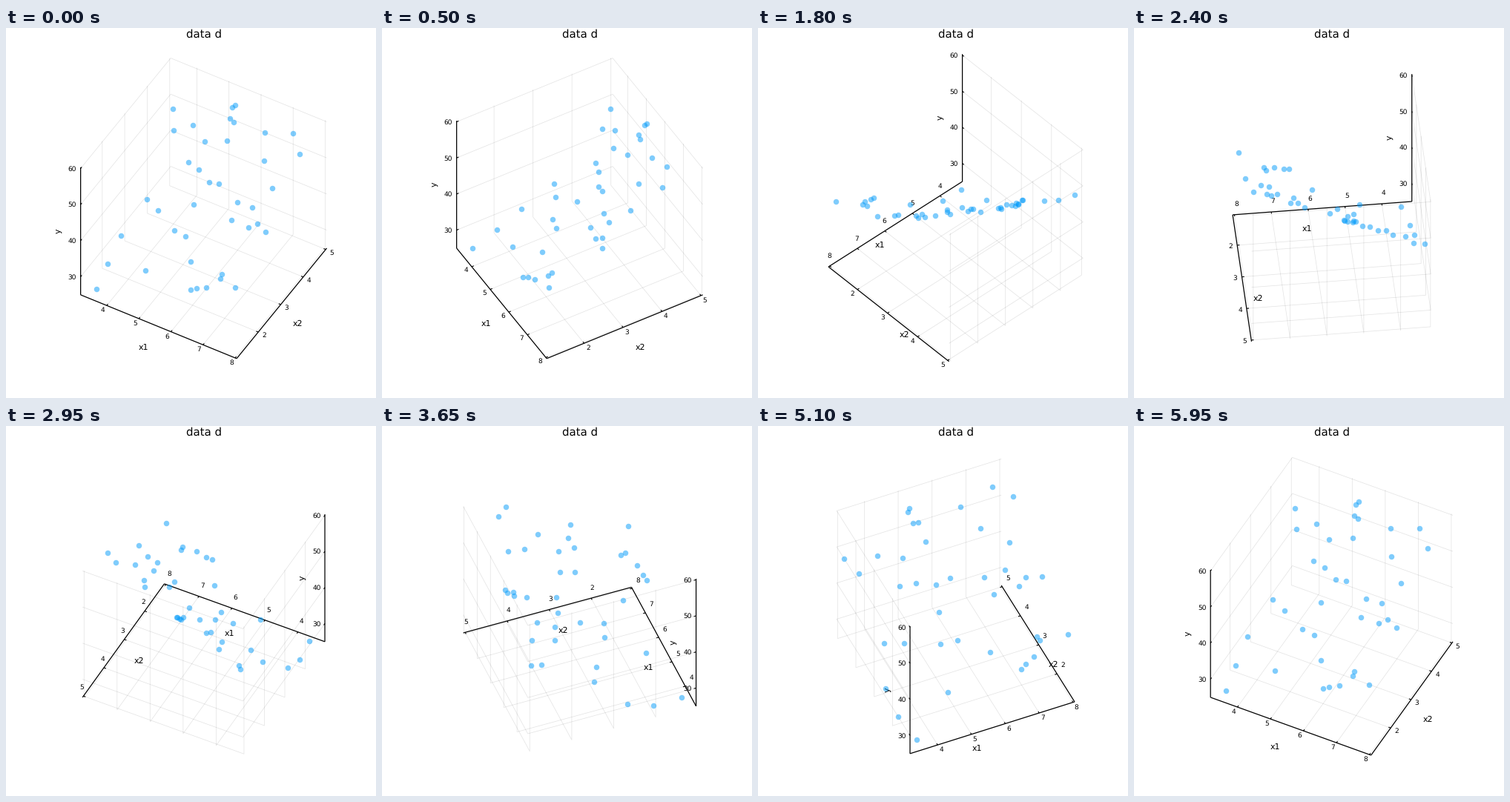
Recreate the animation shown at these times as a matplotlib script. Size 499 px wide and 499 px high, loop 6000 ms.

```python
import numpy as np
import matplotlib.pyplot as plt
from matplotlib.animation import FuncAnimation
from matplotlib.collections import LineCollection

SIZE, DPI = 499, 64
PX = 72 / DPI                    # points per pixel
FRAMES, INTERVAL = 120, 50
EDGE = 243.0                     # cube edge in pixels
H = EDGE / 2
CX, CY = 266.6, 242.5            # cube centre on the stage
TILT = np.sqrt(0.5)              # camera elevation of 45 degrees
TICK_LEN = 3.2
TITLE_EM, LABEL_EM, TICK_EM = 15, 11.2, 8.8

# Observations as (x1, x2, y) offsets from the cube centre
POINTS = np.array([
    (-113.8, 113.9, 32.6), (-101.1, 93.9, 16.3), (-72.8, 96.9, 36.8),
    (-43.4, 77.9, 37.2), (-20.6, 112.4, 84.1), (-17.4, 114.9, 88.0),
    (-18.0, 101.9, 72.5), (-11.0, 99.9, 71.7), (-9.3, 79.9, 53.6),
    (45.6, 85.9, 91.6), (90.6, 82.9, 115.0), (113.1, 62.9, 105.3),
    (61.4, 56.4, 71.3), (-56.9, 57.4, 8.2), (-36.7, 50.4, 11.4),
    (-12.5, 36.4, 11.5), (6.0, 31.4, 21.6), (91.2, 25.9, 60.8),
    (46.7, 10.9, 24.8), (74.1, 2.4, 35.9), (-20.8, 7.9, -10.2),
    (-98.2, 16.9, -47.3), (-73.7, 4.4, -46.1), (50.5, -12.6, 12.3),
    (82.8, -23.6, 24.8), (94.6, -19.1, 33.8), (114.0, -30.6, 36.9),
    (-114.7, -24.6, -88.5), (-32.4, -23.1, -38.8), (-11.0, -30.1, -33.6),
    (19.6, -70.1, -32.7), (-112.9, -63.6, -108.0), (-46.0, -77.6, -75.0),
    (-105.4, -106.6, -114.6), (45.8, -114.6, -34.8), (53.3, -111.6, -30.8),
    (66.9, -109.1, -24.3), (81.6, -96.6, -10.3), (79.9, -89.6, -9.2),
    (114.8, -114.1, 3.8),
])


def scale(values, lo, hi):
    return [((v - lo) / (hi - lo) - 0.5) * EDGE for v in values]


X_VALS, Y_VALS, Z_VALS = range(4, 9), range(2, 6), range(30, 70, 10)
XT = scale(X_VALS, 3.185, 8.047)
YT = scale(Y_VALS, 1.039, 5.045)
ZT = scale(Z_VALS, 24.98, 60.28)

AXES = np.array([
    [(-H, -H, -H), (H, -H, -H)],
    [(H, -H, -H), (H, H, -H)],
    [(-H, -H, -H), (-H, -H, H)],
])
TICKS = np.array(
    [[(x, -H, -H), (x, -H + TICK_LEN, -H)] for x in XT]
    + [[(H, y, -H), (H - TICK_LEN, y, -H)] for y in YT]
    + [[(-H, -H, z), (-H, -H + TICK_LEN, z)] for z in ZT])
GRID = np.array(
    [[(x, -H, -H), (x, H, -H), (x, H, H)] for x in XT]
    + [[(H, y, -H), (-H, y, -H), (-H, y, H)] for y in YT]
    + [[(-H, -H, z), (-H, H, z), (H, H, z)] for z in ZT])


def project(p, az):
    c, s = np.cos(az), np.sin(az)
    x, y, z = p[..., 0], p[..., 1], p[..., 2]
    return np.stack([CX + x * c + y * s,
                     CY + TILT * (x * s - y * c - z)], axis=-1)


def tick_shift(axis):
    """Offset of tick labels, pushed outwards from a projected axis."""
    dx, dy = axis[1] - axis[0]
    n = np.array([-dy, dx]) / np.hypot(dx, dy)
    if abs(n[0]) < 1e-6:
        pad = (0, 5.5 * np.sign(n[1]))
    elif abs(n[1]) < 1e-6:
        pad = (2.9 * np.sign(n[0]), 0)
    else:
        up = n[1] < 0
        pad = (2.9 if n[0] > 0 or up else -2.9, -8.9 if up else 0.3)
    return 6 * n + pad


plt.rcParams.update({"font.family": "DejaVu Sans", "path.snap": False,
                     "text.hinting": "none", "text.hinting_factor": 1})
fig = plt.figure(figsize=(SIZE / DPI, SIZE / DPI), dpi=DPI, facecolor="white")
ax = fig.add_axes([0, 0, 1, 1])
ax.set_xlim(0, SIZE)
ax.set_ylim(SIZE, 0)
ax.axis("off")


def write(text, em, x=0, y=0, ha="center", **kw):
    return ax.text(x, y, text, fontsize=em * PX, ha=ha, va="baseline",
                   color="black", zorder=3, **kw)


def lines(width, zorder, **kw):
    return ax.add_collection(
        LineCollection([], linewidths=width * PX, colors="black",
                       zorder=zorder, **kw), autolim=False)


write("data d", TITLE_EM, 267, 13.2)
grid = lines(0.8, 1, alpha=0.1)
frame = lines(1.25, 2, capstyle="butt")
ticks = lines(1.1, 2, capstyle="butt")
dots = ax.scatter([], [], s=(7.5 * PX) ** 2, c="#009AFA", alpha=0.5,
                  linewidths=0, zorder=4)
x_nums = [write(str(v), TICK_EM) for v in X_VALS]
y_nums = [write(str(v), TICK_EM) for v in Y_VALS]
z_nums = [write(str(v), TICK_EM, ha="right") for v in Z_VALS]
x_name, y_name = write("x1", LABEL_EM), write("x2", LABEL_EM)
z_name = write("y", LABEL_EM, rotation=90, rotation_mode="anchor")


def place(text, pos, em):
    text.set_position((pos[0], pos[1] + 0.365 * em))


def update(i):
    az = np.radians(30 + 3 * i)
    axes, marks = project(AXES, az), project(TICKS, az)
    grid.set_segments(project(GRID, az))
    frame.set_segments(axes)
    ticks.set_segments(marks)
    dots.set_offsets(project(POINTS, az))

    shifts = ([tick_shift(axes[0])] * len(XT) + [tick_shift(axes[1])] * len(YT)
              + [np.array([-5.5, 0])] * len(ZT))
    for num, mark, shift in zip(x_nums + y_nums + z_nums, marks, shifts):
        place(num, mark[0] + shift, TICK_EM)

    mid = axes.mean(axis=1)
    place(x_name, mid[0] + (-20.8, 27), LABEL_EM)
    place(y_name, mid[1] + (21.3, 27), LABEL_EM)
    z_name.set_position(mid[2] + (-27.7, 0))
    return [grid, frame, ticks, dots]


anim = FuncAnimation(fig, update, frames=FRAMES, interval=INTERVAL,
                     repeat=True, blit=False)
plt.show()
```
